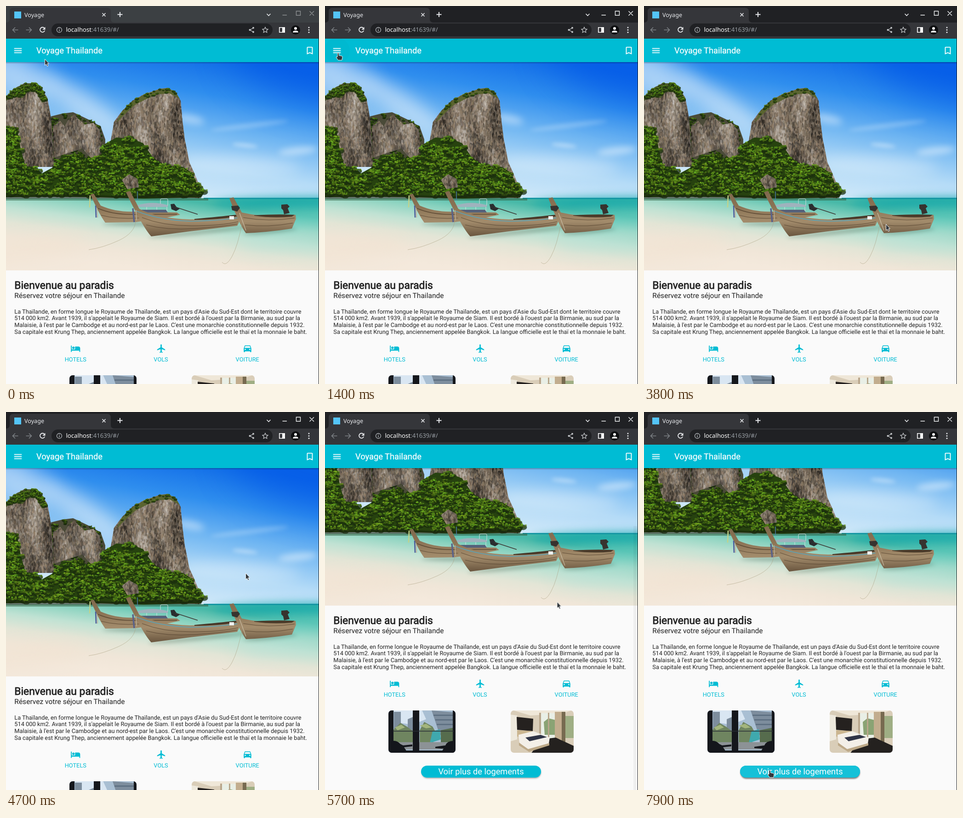
These frames come from a looping animation (681 by 822 pixels, 8000 ms). An HTML page with a canvas:

```html
<!DOCTYPE html>
<html lang="fr">
<head>
<meta charset="utf-8">
<title>Voyage</title>
<style>
html, body { margin: 0; width: 100%; height: 100%; overflow: hidden; background: #202124; }
svg, canvas { position: absolute; left: 0; top: 0; display: block; }
#view { position: absolute; left: 0; top: 122px; width: 680px; height: 700px; overflow: hidden; background: #fafafa; }
text { font-family: Roboto, sans-serif; text-rendering: geometricPrecision; white-space: pre; }
.ui { font-family: "Noto Sans", sans-serif; }
.body { font-size: 12.84px; fill: #212121; }
.tag { font-size: 12.81px; fill: #00bcd4; text-anchor: middle; }

#page, #strip, .dim, #bar, .spot, #glow, #pointer, #arrow, #hand {
  animation: 8s step-end -5ms infinite;
}
#page { position: absolute; left: 0; top: 0; width: 680px; height: 860px; animation-name: scroll; }
#strip { animation-name: strip; }
.dim { animation-name: dim; }
#bar { animation-name: bar; }
#spot1 { animation-name: spot1; }
#spot2 { animation-name: spot2; }
#glow { animation-name: glow; }
#pointer { animation-name: move; }
#arrow { animation-name: arrow; }
#hand { animation-name: hand; }

@keyframes scroll {
  0% { transform: translateY(0); }
  62.5% { transform: translateY(-110px); }
  63.75% { transform: translateY(-144px); }
  65%, 100% { transform: translateY(-154px); }
}
@keyframes bar {
  0% { transform: translateY(122px); opacity: 0; }
  62.5% { transform: translateY(212px); opacity: 1; }
  63.75% { transform: translateY(240px); opacity: 1; }
  65% { transform: translateY(248px); opacity: 1; }
  71.25% { transform: translateY(248px); opacity: 1; animation-timing-function: steps(4, start); }
  76.25%, 100% { transform: translateY(248px); opacity: 0; }
}
@keyframes strip { 0% { fill: #3c4043; } 13.75%, 100% { fill: #202124; } }
@keyframes dim { 0% { opacity: .45; } 13.75%, 100% { opacity: 1; } }
@keyframes spot1 { 0% { opacity: 0; } 10% { opacity: .4; } 20%, 100% { opacity: 0; } }
@keyframes spot2 { 0% { opacity: 0; } 31.25% { opacity: .6; } 32.5% { opacity: 1; } 42.5%, 100% { opacity: 0; } }
@keyframes glow { 0% { opacity: 0; } 97.5% { opacity: .6; } 98.75%, 100% { opacity: 1; } }
@keyframes arrow {
  0% { opacity: 1; } 10% { opacity: 0; } 20% { opacity: 1; } 31.25% { opacity: 0; }
  42.5% { opacity: 1; } 97.5%, 100% { opacity: 0; }
}
@keyframes hand {
  0% { opacity: 0; } 10% { opacity: 1; } 20% { opacity: 0; } 31.25% { opacity: 1; }
  42.5% { opacity: 0; } 97.5%, 100% { opacity: 1; }
}
/* start-steps land on each tenth of a second */
@keyframes move {
  0% { transform: translate(84px, 115px); }
  7.5% { transform: translate(84px, 115px); animation-timing-function: steps(4, start); }
  12.5% { transform: translate(29px, 102px); }
  20% { transform: translate(29px, 102px); animation-timing-function: steps(4, start); }
  25% { transform: translate(300px, 140px); animation-timing-function: steps(5, start); }
  31.25% { transform: translate(648px, 126px); animation-timing-function: steps(2, start); }
  33.75% { transform: translate(657px, 100px); }
  42.5% { transform: translate(575px, 415px); }
  45% { transform: translate(575px, 415px); animation-timing-function: steps(3, start); }
  48.75% { transform: translate(526px, 474px); }
  51.25% { transform: translate(526px, 474px); animation-timing-function: steps(3, start); }
  55% { transform: translate(525px, 358px); }
  57.5% { transform: translate(525px, 358px); animation-timing-function: steps(2, start); }
  60% { transform: translate(521px, 350px); }
  71.25% { transform: translate(521px, 350px); animation-timing-function: steps(4, start); }
  76.25% { transform: translate(455px, 600px); animation-timing-function: steps(5, start); }
  82.5% { transform: translate(472px, 726px); animation-timing-function: steps(4, start); }
  87.5% { transform: translate(191px, 695px); }
  88.75% { transform: translate(191px, 695px); animation-timing-function: steps(9, start); }
  100% { transform: translate(274px, 779px); }
}
</style>
</head>
<body>
<div id="view">
  <div id="page">
    <canvas id="photo" width="680" height="453"></canvas>
    <svg width="680" height="860" viewBox="0 122 680 860">
      <defs>
        <filter id="sh" x="-10%" y="-50%" width="120%" height="220%"><feGaussianBlur stdDeviation="1.4"/></filter>
        <filter id="soft"><feGaussianBlur stdDeviation=".7"/></filter>
        <clipPath id="c1"><rect x="138" y="803" width="146" height="92" rx="7"/></clipPath>
        <clipPath id="c2"><rect x="404" y="803" width="137" height="92" rx="7"/></clipPath>
      </defs>
      <text x="18.3" y="615" font-size="22.87" fill="#212121" stroke="#212121" stroke-width=".75">Bienvenue au paradis</text>
      <text x="18.3" y="634.5" font-size="15.55" fill="#212121">Réservez votre séjour en Thailande</text>
      <g class="body">
        <text x="18.3" y="668.7">La Thaïlande, en forme longue le Royaume de Thaïlande, est un pays d'Asie du Sud-Est dont le territoire couvre</text>
        <text x="18.3" y="683.4">514 000 km2. Avant 1939, il s'appelait le Royaume de Siam. Il est bordé à l'ouest par la Birmanie, au sud par la</text>
        <text x="18.3" y="698">Malaisie, à l'est par le Cambodge et au nord-est par le Laos. C'est une monarchie constitutionnelle depuis 1932.</text>
        <text x="18.3" y="712.7">Sa capitale est Krung Thep, anciennement appelée Bangkok. La langue officielle est le thaï et la monnaie le baht.</text>
      </g>
      <g fill="#00bcd4">
        <path transform="translate(140.3 734) scale(.915)" d="M7 13c1.66 0 3-1.34 3-3S8.66 7 7 7s-3 1.34-3 3 1.34 3 3 3zm12-6h-8v7H3V5H1v15h2v-3h18v3h2v-9c0-2.21-1.79-4-4-4z"/>
        <path transform="translate(327 734) scale(.915)" d="M21 16v-2l-8-5V3.500c0-.83-.67-1.500-1.500-1.500S10 2.670 10 3.500V9l-8 5v2l8-2.500V19l-2 1.500V22l3.500-1 3.500 1v-1.500L13 19v-5.500l8 2.500z"/>
        <path transform="translate(514.5 733.5) scale(.915)" d="M18.92 6.01C18.72 5.42 18.16 5 17.5 5h-11c-.66 0-1.21.42-1.42 1.01L3 12v8c0 .55.45 1 1 1h1c.55 0 1-.45 1-1v-1h12v1c0 .55.45 1 1 1h1c.55 0 1-.45 1-1v-8l-2.08-5.99zM6.5 16c-.83 0-1.5-.67-1.5-1.5S5.67 13 6.5 13s1.5.67 1.5 1.5S7.33 16 6.5 16zm11 0c-.83 0-1.5-.67-1.5-1.5s.67-1.5 1.5-1.5 1.5.67 1.5 1.5-.67 1.5-1.5 1.5zM5 11l1.5-4.5h11L19 11H5z"/>
      </g>
      <text class="tag" x="151.3" y="773">HOTELS</text>
      <text class="tag" x="337" y="773">VOLS</text>
      <text class="tag" x="525.2" y="773">VOITURE</text>

      <g clip-path="url(#c1)">
        <g filter="url(#soft)">
          <path fill="#a9bfd3" d="M130 795h160v110H130z"/>
          <path fill="#d9e6f2" d="M150 800h60l10 22-30 12-40-6z"/>
          <path fill="#7d8d9d" d="M150 806h15v52h-15zM180 822l14-6v34h-14zM232 803l46 4v50h-28z"/>
          <path fill="#5f7183" d="M236 812h42v3h-42zM240 822h38v3h-38zM243 832h35v3h-35z"/>
          <path fill="#6f8560" d="M148 846l16-16 14 8 16 12v25h-46zM206 846l10-18 18 10 8 14-8 24h-28z"/>
          <path fill="#a3b57d" d="M152 840l14-6 8 6-16 6zM206 836l14-4 12 8-12 2z"/>
          <path fill="#3fa9ae" d="M234 848l16-4 2 22-24 8z"/>
          <path fill="#566c4d" d="M252 846l30-6v34h-30z"/>
          <path fill="#8c9296" d="M148 872h136v16H148z"/>
        </g>
        <path fill="#15171c" d="M138 803h11v92h-11zM191 803h14v92h-14zM278 803h6v92h-6zM138 890h146v5H138z"/>
        <path stroke="#2a2f36" stroke-width="1.6" d="M148 848h132"/>
        <path fill="#14161b" d="M142 871q12-6 22 5l6 3 20-2v4l-18 2 8 12H144zM280 869q-14 0-18 10l-22 3v3l18 1-6 9h30z"/>
      </g>
      <g clip-path="url(#c2)">
        <g filter="url(#soft)">
          <path fill="#d9cdb8" d="M400 800h145v100H400z"/>
          <path fill="#efe7d8" d="M400 800h145l-30 10-68 4z"/>
          <path fill="#eee9dd" d="M404 812l14 2v52l-14 4z"/>
          <path fill="#25211f" d="M417 817l36 4-1 27-34-3z"/>
          <path fill="#e9efe6" d="M469 809h34v56h-34z"/>
          <path fill="#8aa374" d="M476 828l10-8 16 4v32h-24z"/>
          <path fill="#b9a78c" d="M466 808h4v56h-4zM485 808h3v54h-3z"/>
          <path fill="#c2ad8e" d="M500 806h16v66h-16z"/>
          <path fill="#776a50" d="M515 806h8v72h-8z"/>
          <path fill="#9fae84" d="M523 815h18v48h-18z"/>
          <path fill="#24211f" d="M470 866l32-4 39 18v20H446z"/>
          <path fill="#cbb690" d="M418 846l36 2 4 8-40 4z"/>
          <path fill="#f3efe8" d="M421 856l32-8 36 14-2 13-46 14-18-16z"/>
          <path fill="#2f3446" d="M436 862l33-6 14 5-38 9z"/>
          <path fill="#bda988" d="M422 873l20 14 46-13v5l-44 14-22-14z"/>
        </g>
      </g>

      <rect x="210" y="925" width="260" height="26" rx="13" fill="#000" opacity=".3" filter="url(#sh)"/>
      <rect x="209" y="923" width="261" height="26" rx="13" fill="#00bcd4"/>
      <g id="glow">
        <rect x="210" y="926" width="259" height="26" rx="13" fill="#000" opacity=".3" filter="url(#sh)"/>
        <rect x="209" y="923" width="261" height="26" rx="13" fill="#14c1d8"/>
      </g>
      <text x="339.5" y="942" font-size="18.3" fill="#fff" text-anchor="middle">Voir plus de logements</text>
    </svg>
  </div>
</div>

<svg width="681" height="822" viewBox="0 0 681 822">
  <defs>
    <linearGradient id="drop" x2="0" y2="1"><stop stop-opacity=".26"/><stop offset="1" stop-opacity="0"/></linearGradient>
    <clipPath id="head"><path d="M0 71h680v51H0z"/></clipPath>
  </defs>
  <rect id="bar" x="671" width="8" height="574" fill="#000" fill-opacity=".05"/>
  <rect y="122" width="680" height="4" fill="url(#drop)"/>
  <rect id="strip" width="681" height="37"/>
  <path fill="#35363a" d="M0 36q8 0 8-8V12q0-8 8-8h204q8 0 8 8v16q0 8 8 8h445v35H0z"/>
  <rect x="99" y="38" width="481" height="28" rx="14" fill="#202124"/>
  <rect x="18" y="12" width="15" height="15" fill="#54c5f8"/>
  <text class="ui" x="40" y="23.7" font-size="12.6" fill="#e8eaed">Voyage</text>
  <text class="ui" x="130.4" y="56.4" font-size="13.2" fill="#fff">localhost<tspan fill="#9aa0a6">:41639/#/</tspan></text>

  <g fill="none" stroke="#e8eaed" stroke-width="1.6">
    <path d="M209.500 15.500l7 7m0-7l-7 7"/>
    <path stroke-width="2" d="M242.500 18.500h11m-5.500-5.500v11"/>
    <path d="M567.500 17l4 4 4-4"/>
    <path stroke="#7d8185" d="M26.500 52h-12m5.500-5.500L14.500 52l5.500 5.500M43.500 52h12m-5.500-5.500l5.500 5.500-5.500 5.500"/>
    <path stroke-width="1.8" d="M83.500 48.200a5.300 5.300 0 1 0 .8 5.300"/>
    <path stroke="#b5b9bd" stroke-width="1.3" d="M121.500 52a5.500 5.500 0 1 1-11 0a5.500 5.500 0 0 1 11 0zM116 51v4m0-6.500v1.300"/>
    <path stroke="#c4c7ca" stroke-width="1.2" d="M538 48l-7.500 4 7.500 4.500"/>
    <path stroke="#c4c7ca" stroke-width="1.3" d="M564 46l1.800 3.900 4.200.5-3.100 2.900.8 4.200-3.700-2.100-3.700 2.100.8-4.200-3.100-2.900 4.200-.5z"/>
    <path stroke="#fff" d="M594.800 46.800h11.400v10.400h-11.400z"/>
  </g>
  <path fill="#e8eaed" d="M85.500 45.500v6h-6z"/>
  <g fill="#c4c7ca"><circle cx="538" cy="47.500" r="2"/><circle cx="530.500" cy="52" r="2"/><circle cx="538" cy="56.500" r="2"/></g>
  <path fill="#fff" d="M601 46h6v12h-6z"/>
  <circle cx="630" cy="52" r="10" fill="#0d0e10"/>
  <path fill="#fff" d="M633 48.800a3 3 0 1 1-6 0a3 3 0 0 1 6 0zM624 57.500q0-4 6-4t6 4z"/>
  <g fill="#e8eaed"><circle cx="659" cy="46.700" r="1.500"/><circle cx="659" cy="52" r="1.500"/><circle cx="659" cy="57.300" r="1.500"/></g>
  <path class="dim" fill="none" stroke="#f1f3f4" stroke-width="1.4" d="M601.500 19.800h9.500M631.500 11.200h9v9h-9zM660.500 11.200l9.500 9.500m0-9.500l-9.500 9.500"/>

  <path fill="#00bcd4" d="M0 71h680v51H0z"/>
  <g clip-path="url(#head)" fill="#000" fill-opacity=".045">
    <circle id="spot1" class="spot" cx="26" cy="97" r="28"/>
    <circle id="spot2" class="spot" cx="661" cy="97" r="28"/>
  </g>
  <g fill="#fff">
    <path transform="translate(15 86) scale(.915)" d="M3 18h18v-2H3v2zm0-5h18v-2H3v2zm0-7v2h18V6H3z"/>
    <path transform="translate(650 86) scale(.915)" d="M17 3H7c-1.1 0-1.99.9-1.99 2L5 21l7-3 7 3V5c0-1.1-.9-2-2-2zm0 15l-5-2.18L7 18V5h10v13z"/>
    <text x="66" y="103.300" font-size="18.3" stroke="#fff" stroke-width=".25">Voyage Thailande</text>
  </g>

  <g id="pointer" fill="#31363b" stroke="#f4f4f4" stroke-linejoin="round">
    <path id="arrow" d="M.5.5v13.500l3-2.500 2.200 4.600 2.300-1.100-2.200-4.500 3.600-.4z"/>
    <path id="hand" d="M-2 1q1.700-2 3.300 0v4.500l5.700 1.200q2.200.5 1.900 2.800l-1.100 6.300H-.5L-4.500 10q-.4-2.200 2.500-1.300z"/>
  </g>
</svg>

<script>
const g = document.getElementById('photo').getContext('2d');
g.translate(0, -122);
let seed = 7;
const rnd = () => (seed = (seed * 16807) % 2147483647) / 2147483647;
const between = (a, b) => a + rnd() * (b - a);

function fade(x0, y0, x1, y1, ...cols) {
  const l = g.createLinearGradient(x0, y0, x1, y1);
  cols.forEach((c, i) => l.addColorStop(i / (cols.length - 1), c));
  return l;
}
function fill(d, c) { g.fillStyle = c; g.fill(new Path2D(d)); }
function line(d, c, w = 1) { g.strokeStyle = c; g.lineWidth = w; g.stroke(new Path2D(d)); }
function blob(x, y, rx, ry, c, turn = 0) {
  g.fillStyle = c;
  g.beginPath();
  g.ellipse(x, y, rx, ry, turn, 0, 7);
  g.fill();
}
function haze(x, y, rx, ry, turn, c, blur) {
  g.filter = `blur(${blur}px)`;
  blob(x, y, rx, ry, c, turn);
  g.filter = 'none';
}
// random spots within a shape, from top to bottom
function scatter(d, [x0, y0, x1, y1], n, draw) {
  const p = new Path2D(d);
  for (let i = 0; i < n; i++) {
    const x = between(x0, x1), y = y0 + (y1 - y0) * i / n;
    if (g.isPointInPath(p, x, y - 122)) draw(x, y);
  }
}
// streaky stone: wide vertical bands of light and shade, broken by cracks
function rock(d, base, box, n) {
  fill(d, base);
  g.save();
  g.clip(new Path2D(d));
  scatter(d, box, n, (x, y) => {
    const band = Math.sin(x / 9 + Math.sin(y / 31)) + Math.sin(x / 21 + y / 45);
    const l = 42 + 9 * band + between(-20, 20);
    g.globalAlpha = .6;
    blob(x, y, between(.8, 2.6), between(2, 8), `hsl(${between(28, 38)} ${between(6, 20)}% ${l}%)`, between(-.2, .2));
  });
  g.restore();
}
// bushes: a dark clump with lit leaves on its upper half
function bushes(d, base, box, n, size = 7, lift = 0) {
  fill(d, base);
  scatter(d, box, n, (x, y) => {
    const r = between(.5, 1) * size;
    const sun = between(22, 36) + lift;
    g.globalAlpha = .75;
    blob(x, y, r, r * .7, `hsl(96 55% ${11 + lift / 2}%)`);
    for (let i = 0; i < 8; i++) {
      const up = rnd();
      blob(x + between(-r, r) * .8, y - r * up * .8, r * .28, r * .2,
        `hsl(${between(76, 94)} 68% ${sun * (.55 + .65 * up)}%)`);
    }
    g.globalAlpha = 1;
  });
}

// sky and clouds
fill('M0 122h680v298H0z', fade(430, 110, 380, 420, '#116de8', '#2f8eee', '#72b7f2', '#b4dbf7', '#d3eaf9'));
haze(680, 120, 190, 90, .2, 'rgba(0,86,232,.6)', 40);
haze(20, 150, 90, 45, .5, 'rgba(225,239,251,.65)', 24);
haze(165, 215, 110, 26, .6, 'rgba(225,239,251,.6)', 18);
haze(400, 246, 32, 9, .2, 'rgba(255,255,255,.45)', 8);
haze(530, 260, 85, 5, -.12, 'rgba(255,255,255,.25)', 5);
haze(635, 315, 42, 8, -.1, 'rgba(255,255,255,.45)', 7);
haze(520, 303, 28, 4, .1, 'rgba(255,255,255,.4)', 4);
haze(510, 345, 130, 18, .05, 'rgba(255,255,255,.3)', 14);

// sea and beach
fill('M0 418h680v157H0z', fade(345, 418, 325, 575, '#48b9a8', '#8bd3c0', '#c0e2d3', '#e3e5d6', '#f0e6d8', '#f4e9dc'));
haze(660, 428, 210, 14, 0, 'rgba(14,166,170,.7)', 9);
haze(660, 462, 130, 20, -.05, 'rgba(105,212,199,.5)', 14);
haze(620, 505, 120, 22, -.1, 'rgba(185,226,213,.6)', 18);
haze(40, 530, 140, 24, -.1, 'rgba(241,227,210,.7)', 18);
fill('M430 417h250v3H430z', '#1597a3');
fill('M0 418h440v5H0z', 'rgba(50,90,60,.5)');

// cliffs
bushes('M98 240L122 234 146 231 165 240 186 250 206 262 216 290 215 350 96 350z', '#4a4a38', [96, 228, 218, 350], 190, 6, -4);
rock('M102 262L118 250 128 262 136 246 148 236 158 246 172 258 190 254 204 270 210 320 186 332 166 310 140 318 104 330z', '#67615a', [100, 232, 214, 335], 1400);
rock('M0 198L22 178 40 168 62 168 78 180 90 200 97 238 100 270 104 350 0 350z', '#7a7269', [0, 165, 106, 352], 2600);
bushes('M0 196L24 176 44 168 64 168 80 182 90 206 78 210 66 188 48 186 36 200 16 198 0 206z', '#4b5a2a', [0, 165, 92, 212], 260, 5);
rock('M228 292L235 252 252 229 275 206 300 192 335 180 352 178 370 188 380 206 384 250 389 290 399 340 410 364 418 384 432 404 420 418 230 400z',
  '#8b7c6b', [226, 178, 434, 418], 5200);
bushes('M240 254L252 230 275 207 300 193 335 181 352 178 370 189 378 202 356 190 330 192 304 203 282 214 262 232z', '#5a6430', [238, 176, 380, 256], 300, 4.5);
bushes('M0 262L24 266 32 310 42 348 64 350 78 364 100 352 122 326 150 322 180 332 205 330 215 300 240 286 272 288 298 298 320 330 345 346 385 350 404 362 415 385 432 404 424 416 300 419 200 416 100 415 0 416z',
  '#27420f', [0, 260, 434, 414], 1500, 8.5, 2);
fill('M0 408Q60 412 110 410T220 412 320 410 430 408L424 418 0 419z', 'rgba(24,38,14,.55)');
rock('M252 378L268 366 286 376 289 394 264 398z', '#77736b', [250, 364, 290, 400], 260);

// boats
haze(290, 474, 80, 4, 0, 'rgba(70,100,85,.4)', 4);
haze(420, 492, 110, 4, -.1, 'rgba(80,100,80,.4)', 4);
haze(575, 490, 58, 4, -.1, 'rgba(70,100,85,.4)', 4);
const wood = fade(0, 405, 0, 500, '#80694d', '#8b7354', '#a38c6c', '#6b5740');
const seam = 'rgba(70,54,36,.7)';

fill('M184 410L191 408 206 434Q240 449 282 447L372 449 379 454 340 462 282 470 216 471Q202 452 184 410z', wood);
line('M200 440Q235 455 284 453L372 453', seam, 1.5);
line('M207 455Q240 464 290 461', seam);
fill('M284 434Q316 423 352 433L352 437 284 437z', '#9fb2bd');
line('M288 437v12M306 437v10M328 437v10M350 437v12M336 430v-9q0-2 3-2h10q3 0 3 2v13', '#d5dde0');
fill('M290 443h58l4 6h-58z', '#55617a');
fill('M358 431l8-1 5 7 7 4-8 5-10-4z', '#2a2d2f');
line('M368 437L417 453', '#3c3a36', 1.6);
line('M183 412l-1 26', '#c2d38a', 2.5);
line('M195 434l1 26', '#4a5a9c', 2.5);
line('M198 440l1 20', '#b9b0a0', 2);

fill('M261 405L270 402 290 441Q330 462 400 464 460 463 506 456L510 464 503 478 400 490 316 501Q298 482 261 405z', wood);
line('M284 446Q335 466 402 468 462 467 507 460', '#5aa3b8', 1.6);
line('M296 460Q340 478 404 478T505 469M305 476Q350 488 410 484T503 474', seam);
fill('M410 463Q465 458 500 454L506 457Q462 465 410 465z', '#473829');
line('M286 403v20', '#4d7ba6', 1.5);
line('M276 440l3 30', '#5a6288', 3.5);
line('M283 444l1 22', '#b7a98e', 2);

fill('M486 418L495 416 513 449Q570 462 630 454L631 463 622 484Q570 492 522 494 507 474 486 418z', wood);
line('M516 460Q572 470 628 461M520 476Q570 482 624 472', seam);
fill('M540 455Q590 452 628 454L622 458Q580 462 540 456z', '#4a3a29');
fill('M599 432l13-1 5 5-4 4 4 10-12 3-2-9-4-4z', '#37332f');
fill('M490 435l15-1 4 5-6 8-11-3z', '#37332f');
fill('M486 457h10v7h-10z', '#eef2f1');

const rope = 'rgba(170,160,130,.6)';
line('M282 468Q280 494 245 510T180 530', rope);
line('M514 470Q505 520 492 544T470 557', rope);
line('M508 450l14 38', '#d7ccb4');
</script>
</body>
</html>
```
